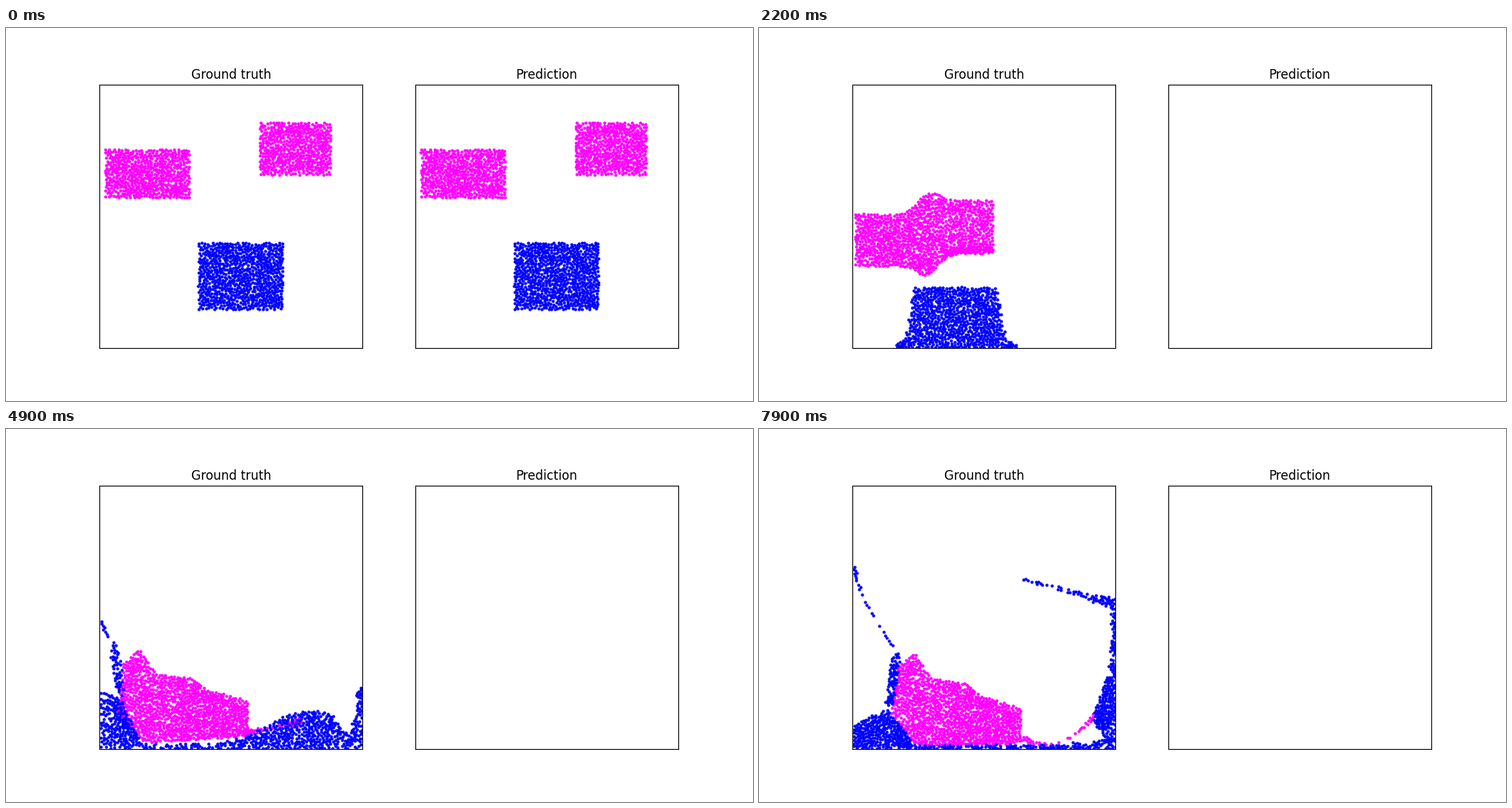
A matplotlib script that plays this animation: 1000x500 px, repeating every 8 s.

```python
import numpy as np
import matplotlib.pyplot as plt
from matplotlib.animation import FuncAnimation

FRAMES, INTERVAL = 80, 100
LEFT, RIGHT, TOP, FLOOR = 125.0, 477.27, 76.36, 428.64
MAGENTA, BLUE = "#ff00ff", "#0000ff"
AREA_PER_DOT = 12.6
GRAVITY = 0.244
rng = np.random.default_rng(4)


def track(*values):
    """Smooth curve through values at four moments of the splash."""
    return np.poly1d(np.polyfit((41, 57, 70, 79), values, 3))


def lerp(a, b, f):
    return a + (b - a) * f


def scatter(n, w, h):
    """Evenly spread random points in a w by h box."""
    p = np.empty((n, 2))
    p[0] = w / 2, h / 2
    for i in range(1, n):
        c = rng.random((14, 2)) * (w, h)
        gap = ((c[:, None] - p[:i]) ** 2).sum(-1).min(1)
        p[i] = c[gap.argmax()]
    return p


def sections(ox, oy, ix, iy):
    """Cross-sections of a band, each from an outer to an inner point."""
    return np.column_stack(np.broadcast_arrays(*map(np.atleast_1d, (ox, oy, ix, iy))))


def fill(band, u, v):
    """Place (u, v) in a band so that the density along it is even."""
    fine = np.linspace(0, len(band) - 1, 6 * len(band))
    s = np.array([np.interp(fine, np.arange(len(band)), c) for c in band.T]).T
    d1 = s[1:, 2:] - s[:-1, :2]
    d2 = s[:-1, 2:] - s[1:, :2]
    area = abs(d1[:, 0] * d2[:, 1] - d1[:, 1] * d2[:, 0]) / 2 + 1e-3
    cum = np.concatenate([[0], np.cumsum(area)])
    ox, oy, ix, iy = (np.interp(u, cum / cum[-1], c) for c in s.T)
    return np.column_stack([lerp(ox, ix, v), lerp(oy, iy, v)])


# Goop: two blocks collide, then slide as one lump that tips onto the floor
peak_x, peak_y = track(159, 190, 200, 209), track(292, 298, 300, 300)
tilt = track(-0.14, 0, 0, 0)
crest = np.array([(168, 318), (190, 299), (212, 334), (256, 340), (280, 358), (331, 373)])
base = np.array([(157, 382), (192, 424), (331, 420)])


def collide(x0, x1, thick=None):
    x = np.linspace(x0, x1, 25)
    mid = 275 - 9.5 * np.tanh((x - 228) / 22)
    half = 35 + 19 * np.exp(-((x - 226) / 20) ** 2)
    return sections(x, mid + half, x, mid + half - (thick or 2 * half))


def lump(a, b):
    f = np.linspace(a, b, 30)
    knots = (crest[:, 0] - crest[0, 0]) / np.ptp(crest[:, 0])
    edges = [np.interp(f, (0, 0.2, 1), c) for c in base.T]
    edges += [np.interp(f, knots, c) for c in crest.T]
    ox, oy, ix, iy = edges

    def pose(t):
        c, s = np.cos(tilt(t)), np.sin(tilt(t))
        out = []
        for x, y in ((ox - 190, oy - 299), (ix - 190, iy - 299)):
            out += [peak_x(t) + c * x - s * y, peak_y(t) + s * x + c * y]
        return sections(*out)
    return pose


# Strand of goop from the foot of the lump to a tip
tail_x, tail_y = track(300, 331, 343, 353), track(393, 413, 414, 414)
tip_x, tip_y = track(357, 420, 445, 448), track(379, 393, 385, 384)
sag = track(2, 7, 19, 21)


def strand(t):
    f = np.linspace(0, 1, 25)
    x = lerp(tail_x(t), tip_x(t), f)
    y = lerp(tail_y(t), tip_y(t), f) + sag(t) * 4 * f * (1 - f)
    half = 0.5 + 3 * (2 * f - 1) ** 2
    return sections(x, y + half, x, y - half)


# Water: jet, column and pool on the left, film on the floor, run-up on the right
jet_y = track(301, 218, 184, 183)
col_x, col_y = track(138, 160, 184, 184), track(318, 283, 295, 298)
foot_x, foot_y = track(146, 158, 164, 174), track(366, 365, 372, 373)
pool_y, toe = track(376, 349, 377, 397), track(170, 186, 194, 204)
film, wave = track(7, 5, 5, 5), track(36, 42, 26, 24)
wave_s, wave_w = track(338, 460, 510, 515), track(62, 68, 50, 50)
reach = track(63, 119, 177, 202)
plume_x, plume_y = track(475, 446, 391, 354), track(365, 320, 235, 200)


def pedestal(x0, x1, a, b, height, fall):
    x = np.linspace(x0, x1, 60)
    beyond = np.maximum(np.maximum(a - x, x - b), 0)
    return sections(x, FLOOR, x, FLOOR - 2 - height * np.exp(-beyond / fall))


def splash(t):
    f = np.linspace(0, 1, 15)
    x, y = lerp(126, col_x(t), f), lerp(jet_y(t), col_y(t), f ** 0.65)
    jet = sections(x, y, x + 1.5, y - 0.5)

    x, y = lerp(col_x(t), foot_x(t), f), lerp(col_y(t), foot_y(t), f)
    half = 1 + 5 * np.sin(np.pi * f ** 0.7) ** 0.5
    column = sections(x - half, y, x + half, y)

    pool = sections(126, np.array([pool_y(t), FLOOR]),
                    np.array([foot_x(t) + 2, toe(t) - 4]),
                    np.array([foot_y(t) + 9, 412]))

    # Path length runs along the floor, then up the right wall
    s = np.linspace(toe(t), 477 + reach(t) - 12, 80)
    h = film(t) + wave(t) * np.exp(-((s - wave_s(t)) / wave_w(t)) ** 2)
    turn = np.clip((s - 437) / 80, 0, 1) * np.pi / 2
    x, y = np.minimum(s, 477), FLOOR - np.maximum(s - 477, 0)
    run = sections(x, y, x - h * np.sin(turn), y - h * np.cos(turn))

    x = lerp(477, plume_x(t), f)
    y = lerp(FLOOR - reach(t), plume_y(t), f ** 1.3)
    h = 1.5 + 11 * (1 - f) ** 3
    plume = sections(x, y, x - h / 2, y + h)
    return np.vstack([jet, column, pool, run, plume])


class Body:
    def __init__(self, rect, vel, fall, hits, late, pull, fling, clump, drift=-1e3):
        x0, y0, x1, y1 = rect
        w, h = x1 - x0, y1 - y0
        p = scatter(int(w * h / AREA_PER_DOT), w, h)
        u, v = p[:, 0] / w, 1 - p[:, 1] / h
        self.rest = p + (x0, y0)
        self.vel, self.pull = np.array(vel), np.array(pull)

        bands = dict(hits) | {t: late(t) for t in range(41, FRAMES, 2)}
        poses = [self.rest + (max(vel[0] * t, drift), vel[1] * t + GRAVITY * t * t / 2)
                 for t in fall]
        poses += [fill(b, u, v) for b in bands.values()]
        self.times = np.array(list(fall) + list(bands), float)
        self.poses = np.array(poses)
        self.speed = np.gradient(self.poses, self.times, axis=0, edge_order=2)

        # Errors of the prediction: jitter, clumping and frayed edges
        near = np.exp(-np.column_stack([p[:, 0], h - p[:, 1]]) / 6)
        hubs = p[rng.choice(len(p), len(p) // 5 + 1, replace=False)]
        hub = hubs[((p[:, None] - hubs) ** 2).sum(-1).argmin(1)]
        self.error = rng.normal(0, 1.1, p.shape) + clump * (hub - p)
        self.error += rng.exponential(1, p.shape) * near * (-fling[0], fling[1])

    def truth(self, t):
        k = min(np.searchsorted(self.times, t, "right") - 1, len(self.times) - 2)
        dt = self.times[k + 1] - self.times[k]
        f = (t - self.times[k]) / dt
        a, b = self.poses[k:k + 2]
        va, vb = self.speed[k:k + 2] * dt
        return ((1 + 2 * f) * (1 - f) ** 2 * a + f * (1 - f) ** 2 * va
                + f * f * (3 - 2 * f) * b + f * f * (f - 1) * vb)

    def prediction(self, t, start):
        return start + self.vel * t + self.pull * t * t / 2 + self.error * (t / 8) ** 2


def relax(p, gap=3.3, steps=8):
    """Push crowded dots apart and keep them inside the box."""
    for _ in range(steps):
        order = np.argsort(p[:, 0])
        q = p[order]
        move = np.zeros_like(q)
        for k in range(1, 60):
            d = q[k:] - q[:-k]
            if d[:, 0].min() > gap:
                break
            dist = np.hypot(d[:, 0], d[:, 1]) + 1e-6
            push = d * (np.clip(gap - dist, 0, None) / dist * 0.27)[:, None]
            move[k:] += push
            move[:-k] -= push
        p[order] = q + move
        p = np.clip(p, (126.5, TOP), (476.5, 428))
    return p


fall = range(0, 17, 4)
slab = Body((133, 163, 245, 227.5), (-0.47, 1.28), fall, {22: collide(129, 226)},
            lump(0, 0.48), (1.33, 3.02), (16, 18), 0.3, drift=-3.8)
step = Body((340, 127, 434.5, 191), (-5.8, 2.08), fall, {22: collide(226, 313)},
            lump(0.48, 1), (1.42, 2.8), (17, 4), 0.3)
tail = Body((340, 192.5, 434.5, 197), (-5.8, 2.08), fall, {22: collide(245, 313, 6)},
            strand, (1.42, 2.8), (17, 6), 0.3)
water = Body((258, 288, 370, 377), (-2.4, 0.09), range(0, 19, 6),
             {22: pedestal(184, 345, 206, 319, 79, 6),
              30: pedestal(126, 450, 165, 320, 46, 40)},
             splash, (0.65, 1.2), (1, 13), 0.45)
bodies = [slab, step, tail, water]
cuts = np.cumsum([len(b.rest) for b in bodies])[:-1]


def truth(t):
    return relax(np.concatenate([b.truth(t) for b in bodies]))


start = np.split(truth(0), cuts)


def prediction(t):
    return np.concatenate([b.prediction(t, s) for b, s in zip(bodies, start)])


moments = [(truth(t), prediction(t)) for t in range(FRAMES)]

fig, axes = plt.subplots(1, 2, figsize=(10, 5), dpi=100)
dots = []
for ax, title in zip(axes, ("Ground truth", "Prediction")):
    ax.set_title(title)
    ax.set(xlim=(LEFT, RIGHT), ylim=(FLOOR, TOP), xticks=[], yticks=[])
    ax.set_aspect(1)
    dots.append([ax.plot([], [], "o", ms=2, color=c)[0] for c in (MAGENTA, BLUE)])


def draw(i):
    for (goop, wet), p in zip(dots, moments[i]):
        goop.set_data(*p[:cuts[-1]].T)
        wet.set_data(*p[cuts[-1]:].T)
    return [d for pair in dots for d in pair]


anim = FuncAnimation(fig, draw, frames=FRAMES, interval=INTERVAL, repeat=True,
                     repeat_delay=0)
plt.show()
```
